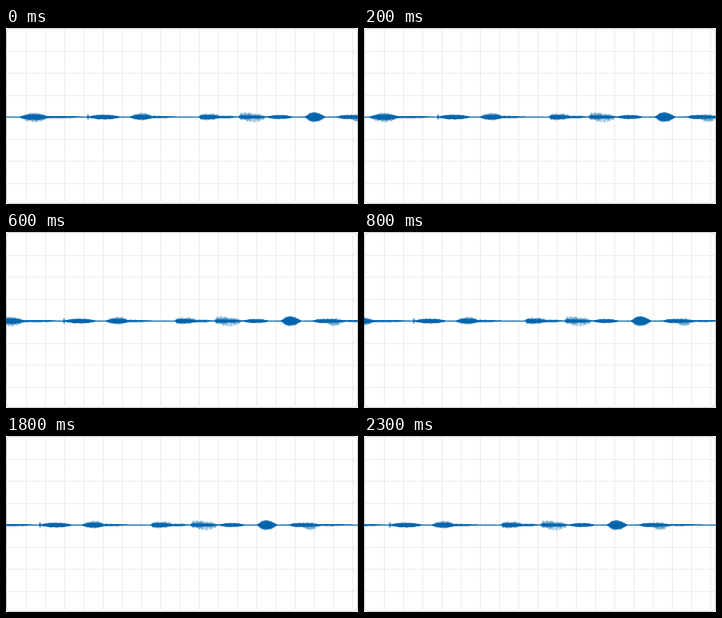
Animation, 440 px wide and 220 px high, one loop 2800 ms. Source, as a matplotlib script:

```python
import numpy as np
import matplotlib.pyplot as plt
from matplotlib.animation import FuncAnimation
from matplotlib.collections import LineCollection
from matplotlib.patches import FancyBboxPatch

W, H, DPI = 440, 220, 100
PX = 72 / DPI
MID = 111.3
BLUE = "#0365ac"
STEP_PX = 10
STEP_TIMES = [200, 400, 600, 800, 1300, 1800, 2300]
INTERVAL, LOOP = 100, 2800

# Bursts: centre, rise, decay, solid half height, peak above, peak below
BURSTS = [
    (34, 14, 17, 3.3, 5.6, 7),
    (60, 20, 40, 1, 1.8, 1.8),
    (102, 1, 2, 1, 5, 4.5),
    (122, 17, 18, 2.5, 3.5, 3.5),
    (169, 12, 14, 2.8, 5.8, 4.8),
    (185, 10, 30, 1, 1.9, 1.9),
    (246, 4, 23, 2.5, 5.5, 4.4),
    (274, 15, 14, 1, 2.6, 2.6),
    (296, 5, 22, 1.9, 6.4, 5),
    (309, 14, 14, 1.7, 5, 6.8),
    (342, 15, 15, 2.1, 3, 2.8),
    (385, 9, 11, 4.9, 6.8, 7.2),
    (426, 11, 28, 2.1, 3.4, 3),
    (440, 9, 10, 1.6, 3.8, 6.8),
    (455, 55, 45, .9, 1.6, 1.6),
]


def stage_axes(fig):
    ax = fig.add_axes([0, 0, 1, 1])
    ax.set(xlim=(0, W), ylim=(H, 0))
    ax.axis("off")
    return ax


def draw_grid(ax):
    for x in range(24, W, 24):
        ax.plot([x + .5] * 2, [1, H - 1], color="#ebebeb", lw=PX)
    for k in range(7):
        y = int(29.4 + 27.5 * k) + .5
        ax.plot([1, W - 1], [y, y], color="#ebebeb", lw=PX)
    ax.add_patch(FancyBboxPatch(
        (.5, .5), W - 1, H - 1, boxstyle="round,pad=0,rounding_size=6",
        fc="none", ec="#cccccc", lw=PX))


def envelopes(x):
    """Solid, upper and lower half heights along x."""
    levels = np.full((3, x.size), .6)
    for centre, rise, decay, *heights in BURSTS:
        width = np.where(x < centre, rise, decay)
        shape = np.exp(-np.abs((x - centre) / width) ** 3)
        levels = np.maximum(levels, np.outer(heights, shape))
    return levels


def draw_wave(ax):
    rng = np.random.default_rng(8)
    x = np.arange(0, 514, .25)
    solid, above, below = envelopes(x)

    def peaks(limit):
        return solid + (limit - solid) * rng.random(x.size) ** 1.8

    ripple = np.repeat(rng.uniform(.8, 1.15, x.size // 4), 4)
    ax.fill_between(x, MID - solid * ripple, MID + solid * ripple,
                    color=BLUE, lw=0)
    top, bottom = MID - peaks(above), MID + peaks(below)
    strokes = np.stack([np.c_[x, top], np.c_[x, bottom]], axis=1)
    ax.add_collection(LineCollection(strokes, colors=BLUE, linewidths=.3 * PX))


fig = plt.figure(figsize=(W / DPI, H / DPI), dpi=DPI, facecolor="white")
draw_grid(stage_axes(fig))
wave_ax = stage_axes(fig)
draw_wave(wave_ax)
wave_ax.set_ylim(H, 0)


def update(frame):
    steps = sum(frame * INTERVAL >= t for t in STEP_TIMES)
    shift = STEP_PX * steps
    wave_ax.set_xlim(shift, shift + W)
    return []


anim = FuncAnimation(fig, update, frames=LOOP // INTERVAL,
                     interval=INTERVAL, repeat=True, repeat_delay=0)
plt.show()
```
